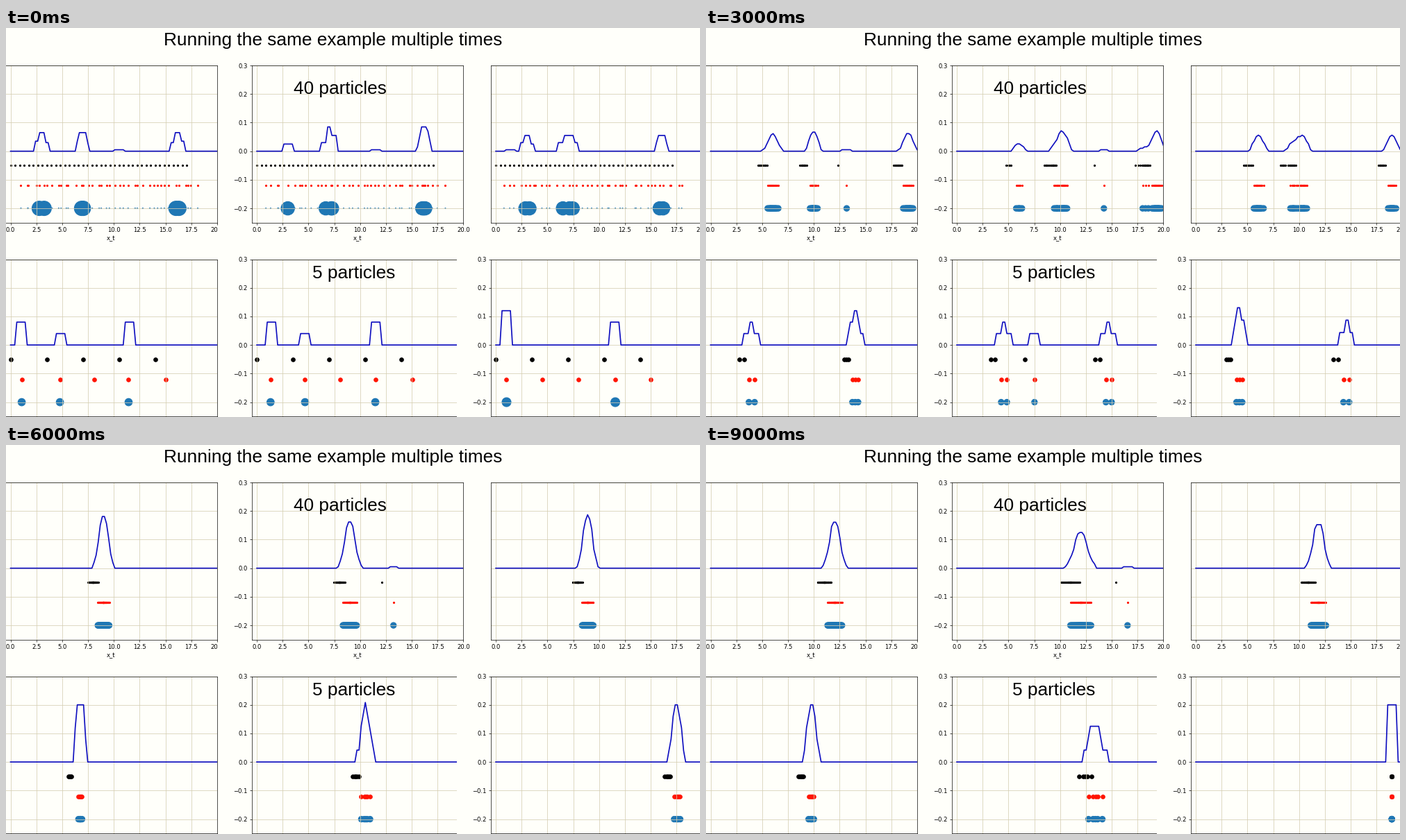
Write a matplotlib script that moves like this. It is 999x561 px and loops after 10 s.

```python
import numpy as np
import matplotlib.pyplot as plt
from matplotlib.animation import FuncAnimation
from matplotlib.patches import Rectangle

W, H, DPI = 999, 561, 64
PT = 61.3 / 64            # point sizes relative to a standard plot
PAPER = "#fffffa"
STEPS, SECOND = 10, 4     # measurements arrive at steps 0 and SECOND
WALL = 18.98              # the tracked particles stop here
GRID = np.linspace(0, 20, 100)

plt.rcParams.update({
    "font.family": "DejaVu Sans", "font.size": 10 * PT,
    "axes.linewidth": 0.8 * PT, "axes.labelpad": 4 * PT,
    "grid.color": "#d5ceb3", "grid.linewidth": 0.9 * PT,
    "axes.facecolor": PAPER, "toolbar": "None",
})
for tick in ("xtick", "ytick"):
    plt.rcParams.update({f"{tick}.major.size": 3.5 * PT,
                         f"{tick}.major.width": 0.8 * PT,
                         f"{tick}.major.pad": 3.5 * PT})


class Group:
    """Copies of matched particles that drift right and diffuse."""

    def __init__(self, n, x, drift=1.01, width=0, grow=0.16, distinct=1, last=STEPS):
        self.n, self.x, self.drift = n, x, drift
        self.width, self.grow = width, grow
        self.distinct, self.last = distinct, last

    def points(self, k, m):
        half = np.sqrt(self.width ** 2 + self.grow ** 2 * k)
        u = np.linspace(-1, 1, m) if m > 1 else np.zeros(1)
        return self.x + self.drift * k + half * np.sign(u) * abs(u) ** 1.6


def place(groups, k):
    """Positions and kept copies; a group that ends hands its copies on."""
    pos, kept, spare = [], [], 0
    for g in groups:
        n = g.n + spare if k < g.last else 0
        spare = 0 if k < g.last else spare + g.n
        if k > g.last:
            continue
        m = g.distinct if k == 0 else max(n, 1)
        pos.extend(g.points(k, m))
        kept.extend([n / m] * m)
    return np.array(pos), np.array(kept)


def density(pos, kept):
    cover = (abs(GRID[:, None] - pos) < 0.5) @ kept
    return cover / cover.sum()


def measure(prior, pos, kept, n, rng):
    """Add the moved particles that did not match and weigh all of them."""
    reach, jitter, miss = (0.3, 0.25, 0.002) if n > 5 else (0.6, 0.1, 0)
    guess = prior + 1
    lost = guess[abs(guess[:, None] - pos).min(axis=1) > reach]
    lost = lost + rng.uniform(-jitter, jitter, len(lost))
    weight = np.where(kept / n > 0.04, 1, miss)
    weight = np.append(weight, np.full(len(lost), miss))
    return np.append(pos, lost), weight / weight.sum()


def run(n, first, second, seed):
    """All (prior, moved, weights, curve) states of one experiment."""
    rng = np.random.default_rng(seed)
    prior = 17.5 * np.arange(n) / n
    states = []
    for t in range(STEPS):
        if t < SECOND:
            pos, kept = place(first, t)
        else:
            pos, kept = place(second, t - SECOND)
            pos = np.minimum(pos, WALL)
        curve, survivors = density(pos, kept), pos[kept > 0]
        weight = np.full(len(pos), 1 / n)
        if t in (0, SECOND):
            pos, weight = measure(prior, pos, kept, n, rng)
        states.append((prior, pos, weight, curve))
        prior = survivors
    return states


# particle count, groups after the first and after the second measurement
RUNS = [
    (40,
     [Group(7, 2.78), Group(6, 3.25), Group(7, 6.88), Group(6, 7.05),
      Group(1, 10.6, drift=0.86), Group(6, 16.02, 0.97), Group(7, 16.3)],
     [Group(40, 6.98, width=0.42, grow=0.25, distinct=13)]),
    (40,
     [Group(5, 3), Group(6, 6.67), Group(5, 7.2, 1.04), Group(6, 7.28, 1.04),
      Group(1, 11.45, 0.93), Group(3, 16.02, 0.75), Group(7, 16.15, 1.01),
      Group(7, 16.3, 1.08)],
     [Group(39, 7, 1, width=0.27, grow=0.43, distinct=5), Group(1, 11.03, 1.1)]),
    (40,
     [Group(1, 1.35, last=2), Group(6, 2.87), Group(5, 3.26), Group(6, 6.5, 0.98),
      Group(5, 7.13), Group(6, 7.45), Group(6, 15.87), Group(5, 16.2, 0.97)],
     [Group(40, 6.92, 0.99, width=0.37, grow=0.28, distinct=12)]),
    (5,
     [Group(2, 1.08, 0.97), Group(1, 4.78, last=2), Group(2, 11.43, 0.86)],
     [Group(5, 4.75, 1, width=0.08, grow=0.11, distinct=2)]),
    (5,
     [Group(2, 1.33, 1.08), Group(1, 4.67, 0.95), Group(2, 11.47, 1.08)],
     [Group(5, 8.62, 0.96, grow=0.3)]),
    (5,
     [Group(3, 1.04, 1.06), Group(2, 11.57, 1)],
     [Group(5, 15.7, 0.93, width=0.24, grow=0.12, distinct=2)]),
]

fig = plt.figure(figsize=(W / DPI, H / DPI), dpi=DPI, facecolor=PAPER)


class Panel:
    def __init__(self, left, top, n, states):
        w, h = 304.8, 226.7
        ax = fig.add_axes([left / W, 1 - (top + h) / H, w / W, h / H])
        ax.set(xlim=(-0.5, 20), ylim=(-0.25, 0.3),
               xticks=np.arange(0, 20.1, 2.5), yticks=np.arange(-2, 4) / 10)
        ax.grid(True)
        self.ax, self.states = ax, states
        self.scale = 90 * n * PT ** 2
        self.black, self.red, self.blue = (
            ax.scatter([], [], s=200 / n * PT ** 2, color=c, linewidths=1.5 * PT)
            for c in ("black", "#ff1400", "#1f77b4"))
        self.line, = ax.plot([], [], color="#1010c0", lw=2 * PT)

    def show(self, t):
        prior, pos, weight, curve = self.states[t]
        seen = weight > 0
        rows = ((self.black, prior, -0.05), (self.red, pos, -0.12),
                (self.blue, pos[seen], -0.2))
        for dots, x, y in rows:
            dots.set_offsets(np.column_stack([x, np.full(len(x), y)]))
        self.blue.set_sizes(self.scale * weight[seen])
        self.line.set_data(GRID, curve)


def cover(x, y, w, h):
    fig.add_artist(Rectangle((x / W, 1 - (y + h) / H), w / W, h / H,
                             transform=fig.transFigure, color=PAPER, lw=0, zorder=5))


def caption(x, y, text):
    fig.text(x / W, 1 - y / H, text, ha="center", va="baseline", color="black",
             family="Liberation Sans", size=26.3 * 72 / DPI, zorder=6)


LEFTS, TOPS = (-0.9, 353.6, 697.6), (54, 333.5)
panels = [Panel(LEFTS[i % 3], TOPS[i // 3], setup[0], run(*setup, seed=i + 1))
          for i, setup in enumerate(RUNS)]

for p in panels[:2]:
    p.ax.set_xlabel("x_t")
panels[2].ax.tick_params(axis="y", left=False, labelleft=False)

# the plots are cropped at these edges
cover(304.6, 283, 30, 18)
cover(648.5, 325, 20, 236)

caption(470.5, 25.5, "Running the same example multiple times")
caption(480.5, 95, "40 particles")
caption(500.5, 361, "5 particles")


def update(t):
    for p in panels:
        p.show(t)
    return []


anim = FuncAnimation(fig, update, frames=STEPS, interval=1000, repeat=True,
                     repeat_delay=0, blit=False)
plt.show()
```
